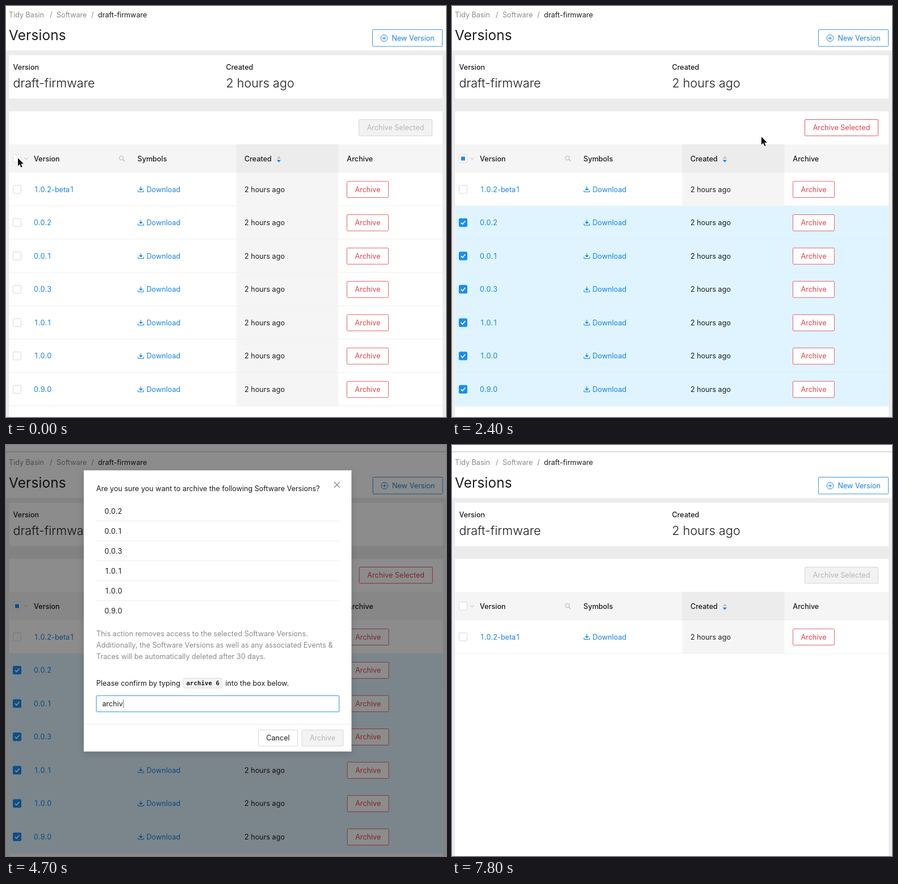
Recreate the animation shown at these times as an HTML page with a canvas. Size 775 by 722 pixels, loop 8 s.

```html
<!DOCTYPE html>
<html lang="en">
<head>
<meta charset="utf-8">
<title>Archive versions</title>
<style>
  html, body { margin: 0; width: 100%; height: 100%; overflow: hidden; background: #ececec; }
  canvas { display: block; width: 775px; height: 722px; }
</style>
</head>
<body>
<canvas id="stage" width="775" height="722"></canvas>
<script>
const ctx = document.getElementById('stage').getContext('2d');
const BLUE = '#1583e0', RED = '#e0434c', INK = '#1c1c1c', GREY = '#8a8a8a', CLEAR = 'transparent';
const LOOP = 8000, ROW = 58.55, HEAD_BOTTOM = 293;
const SELECT_ALL = 500, DESELECT = 1600, OPEN = 2850, FOCUS = 4100,
      SUBMIT = 5900, CLOSE = 6542, REMOVED = 6700;
const PROJECT = 'draft-firmware';
const versions = ['1.0.2-beta1', '0.0.2', '0.0.1', '0.0.3', '1.0.1', '1.0.0', '0.9.0'];
const typed = 'archive 6';
const keyTimes = [4200, 4300, 4400, 4500, 4600, 4700, 4900, 5000, 5100];

// Pointer stops: time, x, y
const stops = [
  [0, 21, 267], [100, 20, 264], [900, 20, 264], [1300, 21, 320], [1800, 21, 320],
  [2600, 642, 213], [2950, 642, 213], [3400, 470, 381], [3600, 470, 381],
  [3900, 400, 452], [5200, 400, 452], [5600, 569.5, 514], [6100, 569.5, 514],
  [6500, 569, 516], [7150, 569, 516], [7800, 560, 740]
];
const arrow = new Path2D('M0 0V14L3.2 11 5.5 16.4 7.7 15.5 5.4 10.2H10Z');
const hand = new Path2D('M3.5 9V1.8a1.3 1.3 0 0 1 2.6 0V6.5a1.2 1.2 0 0 1 2.4 0a1.2 1.2 0 0 1 2.4.6a1.1 1.1 0 0 1 2.3.6V11Q13 14 11.6 16H5Q3.5 13 .8 10.2A1.3 1.3 0 0 1 3.5 9Z');

const clamp = v => Math.max(0, Math.min(1, v));
const within = (t, a, b) => t >= a && t < b;
const circOut = u => Math.sqrt(1 - (1 - u) ** 2);
const circInOut = u => u < .5 ? (1 - Math.sqrt(1 - 4 * u * u)) / 2
                              : (1 + Math.sqrt(1 - (2 - 2 * u) ** 2)) / 2;

function rect(x, y, w, h, color) {
  ctx.fillStyle = color;
  ctx.fillRect(x, y, w, h);
}
function box(x, y, w, h, fill, border, radius = 1.5) {
  ctx.beginPath();
  ctx.roundRect(x, y, w, h, radius);
  ctx.fillStyle = fill;
  ctx.fill();
  ctx.strokeStyle = border;
  ctx.lineWidth = 1;
  ctx.stroke();
}
function line(color, width, ...points) {
  ctx.beginPath();
  for (let i = 0; i < points.length; i += 2) ctx.lineTo(points[i], points[i + 1]);
  ctx.strokeStyle = color;
  ctx.lineWidth = width;
  ctx.stroke();
}
function circle(x, y, r, color, from = 0, to = 2 * Math.PI) {
  ctx.beginPath();
  ctx.arc(x, y, r, from, to);
  ctx.strokeStyle = color;
  ctx.lineWidth = 1;
  ctx.stroke();
}
// y is the middle of the capitals
function text(s, x, y, color = INK, { size = 12.6, weight = 400, align = 'left', spacing = 0, family = 'Inter, sans-serif' } = {}) {
  ctx.font = `${weight} ${size}px ${family}`;
  ctx.letterSpacing = spacing + 'px';
  ctx.textAlign = align;
  ctx.fillStyle = color;
  ctx.fillText(s, x, y + size * .364);
}
// Version numbers use tabular digits: each is centred in the width of a zero
function versionText(s, x, y, color) {
  for (const part of s.match(/\d|\D+/g)) {
    text('', x, y, color);
    const own = ctx.measureText(part).width;
    const cell = /\d/.test(part) ? ctx.measureText('0').width : own;
    text(part, x + (cell - own) / 2, y, color);
    x += cell;
  }
}
function button(label, x, y, w, fill, border, color) {
  box(x + .5, y + .5, w - 1, 28.5, fill, border);
  text(label, x + w / 2, y + 14.5, color, { align: 'center' });
}
function checkbox(y, state) {
  const on = state === 'on';
  box(12.5, y - 7, 14, 14, on ? '#1c8cf0' : '#fff', on ? '#1c8cf0' : '#d9d9d9');
  if (on) line('#fff', 1.7, 15.8, y, 18.6, y + 2.8, 23.4, y - 2.8);
  if (state === 'some') rect(16, y - 3.5, 7, 7, '#1c8cf0');
}
function triangle(x, y, dir, color) {
  ctx.beginPath();
  ctx.moveTo(x - 3.7, y);
  ctx.lineTo(x + 3.7, y);
  ctx.lineTo(x, y + 4.2 * dir);
  ctx.fillStyle = color;
  ctx.fill();
}
function downloadLink(y) {
  line(BLUE, 1, 232.5, y + 1.5, 232.5, y + 4.5, 242.5, y + 4.5, 242.5, y + 1.5);
  line(BLUE, 1, 237.5, y - 5, 237.5, y + 1.5);
  triangle(237.5, y - 1, .8, BLUE);
  text('Download', 247.5, y, BLUE);
}

function drawPage(t, pointer, flat) {
  const shade = color => flat ? '#fff' : color;
  const shift = within(t, 2800, REMOVED) ? .7 : 0;
  const right = 769 + shift;
  const bold = { weight: 500 }, light = { size: 21.6, weight: 300 };

  rect(0, -20, 775, 98, '#fff');
  rect(0, -4, 775, 1.5, '#d2d2d2');
  text('Tidy Basin', 5, 15, GREY);
  text('/', 77, 15, GREY);
  text('Software', 89, 15, GREY);
  text('/', 150, 15, GREY);
  text(PROJECT, 162, 15);
  text('Versions', 5, 51.5, INK, { size: 24.3, spacing: .2 });
  box(645.5 + shift, 41.5, 123, 29.5, '#fff', '#3c96e4');
  const plusX = 666 + shift;
  circle(plusX, 56.5, 5.8, BLUE);
  line(BLUE, 1, plusX - 3, 56.5, plusX + 3, 56.5);
  line(BLUE, 1, plusX, 53.5, plusX, 59.5);
  text('New Version', 679.5 + shift, 56.5, BLUE);

  rect(0, 78, 775, 700, shade('#ececec'));
  rect(5.5, 86.5, right - 5.5, 76, '#fff');
  text('Version', 12.5, 107, INK, bold);
  text(PROJECT, 12.5, 135, INK, light);
  text('Created', 387.5, 107, INK, bold);
  text('2 hours ago', 387.5, 135, INK, light);

  rect(5.5, 185, right - 5.5, 600, '#fff');
  const active = within(t, SELECT_ALL, REMOVED);
  button('Archive Selected', 621 + shift, 199, 130, active ? '#fff' : '#f2f2f2',
    active ? '#e2585f' : '#d6d6d6', active ? RED : '#b6b6b6');

  rect(5.5, 243, right - 5.5, 50, shade('#f5f5f6'));
  rect(405.5, 243, 180, 50, shade('#ececed'));
  const cleared = t >= CLOSE;
  checkbox(268, cleared || t < SELECT_ALL ? 'off' : t < DESELECT ? 'on' : 'some');
  line('#b5b5b5', 1, 32, 266.3, 35.5, 269.8, 39, 266.3);
  text('Version', 49, 268, INK, bold);
  circle(203.2, 267, 3.6, '#b0b0b0');
  line('#b0b0b0', 1.2, 206, 269.8, 209, 272.8);
  text('Symbols', 231.5, 268, INK, bold);
  text('Created', 420, 268, INK, bold);
  triangle(480.5, 268, -1, '#bdbdbd');
  triangle(480.5, 270.5, 1, BLUE);
  text('Archive', 600.3 + shift, 268, INK, bold);

  const hovered = t < 2700 ? Math.floor((pointer.y - HEAD_BOTTOM) / ROW) : -1;
  const count = t < REMOVED ? versions.length : 1;
  versions.slice(0, count).forEach((version, i) => {
    const top = HEAD_BOTTOM + i * ROW, y = top + 29;
    const selected = !cleared && t >= SELECT_ALL && (i > 0 || t < DESELECT);
    const hover = i === hovered;
    if (selected) rect(5.5, top, right - 5.5, ROW, shade(hover ? '#d5efff' : '#dff4ff'));
    else {
      if (hover) rect(5.5, top, right - 5.5, ROW, '#fafafa');
      rect(405.5, top, 180, ROW, shade(hover ? '#fafafa' : '#f5f5f6'));
    }
    rect(5.5, top + ROW - 1, right - 5.5, 1, flat ? '#f8f8f8' : selected ? '#dcf0fa' : '#efefef');
    checkbox(y, selected ? 'on' : 'off');
    versionText(version, 49, y, BLUE);
    downloadLink(y);
    text('2 hours ago', 420, y);
    button('Archive', 600 + shift, y - 14.5, 74, '#fff', '#e2666c', RED);
  });
}

function drawModal(t, shown) {
  const scale = .2 + .8 * shown;
  const loading = t >= SUBMIT, closing = t >= CLOSE;
  const entry = typed.slice(0, keyTimes.filter(k => t >= k).length);
  const focused = within(t, FOCUS, SUBMIT);
  ctx.save();
  ctx.globalAlpha = shown;
  ctx.translate(643, 230);
  ctx.scale(scale, scale);
  ctx.translate(-643, -230);

  ctx.save();
  ctx.shadowColor = 'rgba(0,0,0,.15)';
  ctx.shadowBlur = 12;
  ctx.shadowOffsetY = 4;
  rect(137, 44.5, 471.5, 494, '#fff');
  ctx.restore();
  text('Are you sure you want to archive the following Software Versions?', 159, 76);
  line('#7c7c7c', 1.1, 578, 65, 588, 75);
  line('#7c7c7c', 1.1, 588, 65, 578, 75);
  versions.slice(1).forEach((version, i) => {
    versionText(version, 173.5, 116 + 35 * i, INK);
    if (i) rect(159, 98 + 35 * i, 428, 1, '#ececec');
  });
  ['This action removes access to the selected Software Versions.',
   'Additionally, the Software Versions as well as any associated Events &',
   'Traces will be automatically deleted after 30 days.'
  ].forEach((s, i) => text(s, 159, 331 + 20 * i, GREY));
  text('Please confirm by typing', 159, 418);
  box(312.5, 409.5, 68, 17.5, '#f3f3f3', '#dedede', 3);
  text(typed, 317.5, 418.5, INK, { size: 10.8, weight: 700, family: '"DejaVu Sans Mono", monospace' });
  text('into the box below.', 386.5, 418);

  if (focused) box(158, 439.5, 430, 30, '#cfeaff', '#cfeaff', 3);
  box(159.5, 440.5, 427, 28, focused ? '#fff' : CLEAR, focused ? '#4fb0ee' : '#d0d0d0');
  text(entry, 169.5, 454.5);
  if (focused) rect(170 + ctx.measureText(entry).width, 447, 1, 15, '#777');

  rect(137, 490, 471.5, 1, '#ececec');
  button('Cancel', loading ? 424 : 444, 500, 70, CLEAR, '#d9d9d9', INK);
  if (loading) {
    const fill = closing ? '#8d9798' : '#f79c9d';
    box(501.5, 500.5, 92, 28.5, fill, fill);
    if (closing) rect(501, 522, 90, 7, '#f29a9b');
    const spin = t / 160;
    circle(516, 514.5, 5, '#fff', spin, spin + 1.6);
    text('Archive', 534.5, 514.5, '#fff');
  } else if (entry === typed) {
    const fill = t >= 5500 ? '#fa7a7b' : '#f9504f';
    button('Archive', 520.5, 500, 74, fill, fill, '#fff');
  } else button('Archive', 520.5, 500, 74, '#f3f3f3', '#d9d9d9', '#b6b6b6');
  ctx.restore();
}

function pointerAt(t) {
  const i = Math.max(1, stops.findIndex(s => s[0] > t));
  const [t0, x0, y0] = stops[i - 1], [t1, x1, y1] = stops[i];
  const u = clamp((t - t0) / (t1 - t0)), e = u * u * (3 - 2 * u);
  return { x: x0 + (x1 - x0) * e, y: y0 + (y1 - y0) * e };
}
function drawPointer(t, { x, y }) {
  if (within(t, 4200, 5200) || t >= 7800) return;
  const pressing = [[100, 1000], [1200, 1900], [2500, 2800], [5500, 6100]].some(([a, b]) => within(t, a, b));
  ctx.save();
  ctx.translate(x, y);
  ctx.lineJoin = 'round';
  if (within(t, 3800, 5300)) {
    line('#222', 1, -3, -8, 0, -6.5, 0, 6.5, -3, 8);
    line('#222', 1, 3, -8, 0, -6.5, 0, 6.5, 3, 8);
  } else {
    if (pressing) ctx.translate(-5, -1);
    const shape = pressing ? hand : arrow;
    ctx.lineWidth = pressing ? 1.2 : 1.8;
    ctx.strokeStyle = pressing ? '#111' : '#fff';
    ctx.fillStyle = pressing ? '#fff' : '#111';
    ctx.stroke(shape);
    ctx.fill(shape);
    if (pressing) for (const gx of [6.3, 8.5, 10.7]) line('#111', .8, gx, 10, gx, 13);
  }
  ctx.restore();
}

function draw(t) {
  const shown = t < CLOSE ? circOut(clamp((t - OPEN) / 300))
                          : 1 - circInOut(clamp((t - CLOSE) / 200));
  const flat = shown > 0 && (shown < .7 || t >= CLOSE);
  const pointer = pointerAt(t);
  ctx.clearRect(0, 0, 775, 722);
  ctx.save();
  if (t >= 2800) ctx.translate(0, 15);
  drawPage(t, pointer, flat);
  ctx.restore();
  if (shown > 0) {
    // The backdrop trails the dialog a little
    const dim = shown ** 1.3;
    rect(0, 0, 775, 722, t < CLOSE ? `rgba(0,0,0,${.45 * dim})` : `rgba(0,12,14,${.42 * dim})`);
    drawModal(t, shown);
  }
  drawPointer(t, pointer);
}

function tick() {
  draw(Math.floor(performance.now() % LOOP / 100) * 100);
  requestAnimationFrame(tick);
}
tick();
</script>
</body>
</html>
```
